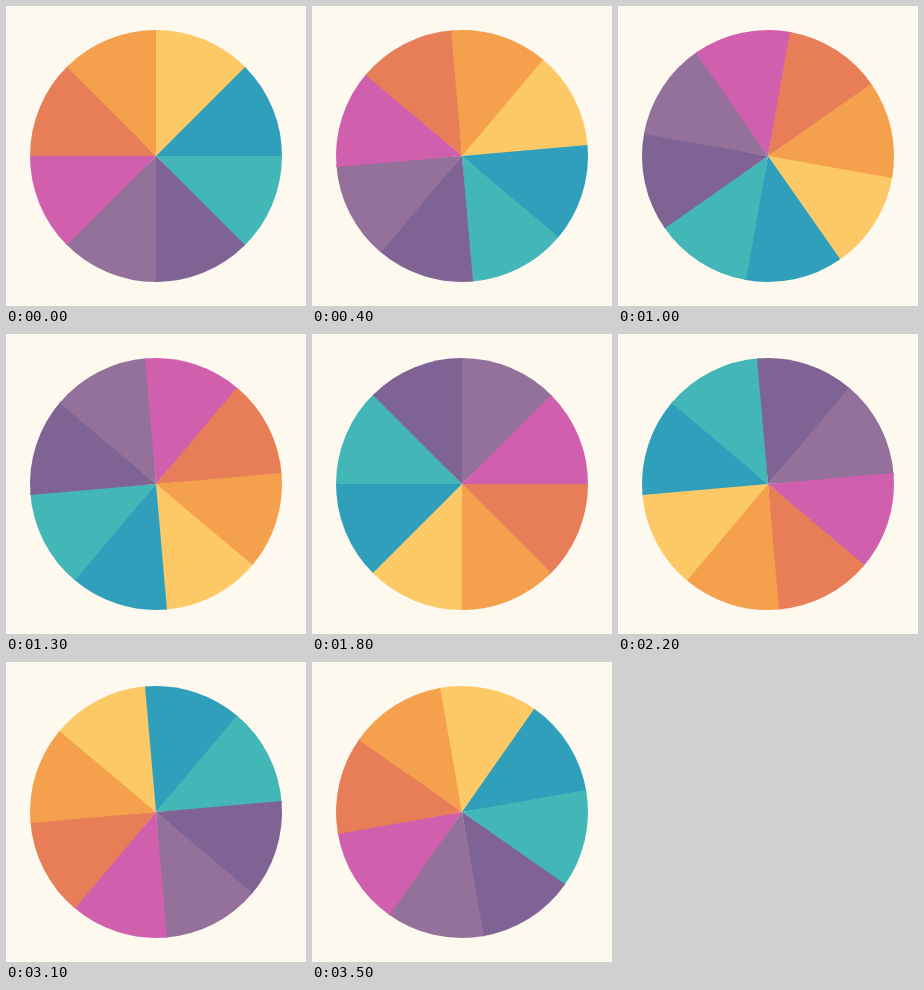
Recreate the animation shown at these times as an HTML page with a canvas. Size 300x300 px, loop 3.6 s.

```html
<!DOCTYPE html>
<html lang="en">
<head>
<meta charset="utf-8">
<title>Colour wheel</title>
<style>
  html, body { margin: 0; width: 100%; height: 100%; overflow: hidden; background: #fef9ee; }
  canvas { display: block; width: 300px; height: 300px; }
</style>
</head>
<body>
<canvas id="wheel" width="300" height="300"></canvas>
<script>
const COLORS = ['#fcc966', '#2f9fbc', '#43b7b8', '#7e6394', '#94719a', '#d05fae', '#e87e57', '#f5a04c'];
const LOOP = 3600, STEP = 100, TURN = 10;
const CENTER = 150, RADIUS = 126;
const SLICE = 360 / COLORS.length;
const ctx = document.getElementById('wheel').getContext('2d');
const rad = deg => (deg - 90) * Math.PI / 180;

function drawWheel(angle) {
  ctx.fillStyle = '#fef9ee';
  ctx.fillRect(0, 0, 300, 300);
  COLORS.forEach((color, i) => {
    // Tuck a sliver under the neighbouring slice so no gap shows.
    const from = angle + i * SLICE - (i === 0 ? 1 : 0);
    const to = angle + (i + 1) * SLICE + (i < COLORS.length - 1 ? 1 : 0);
    ctx.beginPath();
    ctx.moveTo(CENTER, CENTER);
    ctx.arc(CENTER, CENTER, RADIUS, rad(from), rad(to));
    ctx.closePath();
    ctx.fillStyle = color;
    ctx.fill();
  });
}

const start = performance.now();
function tick() {
  const time = Math.max(0, performance.now() - start) % LOOP;
  drawWheel(Math.floor(time / STEP) * TURN);
  requestAnimationFrame(tick);
}
tick();
</script>
</body>
</html>
```
